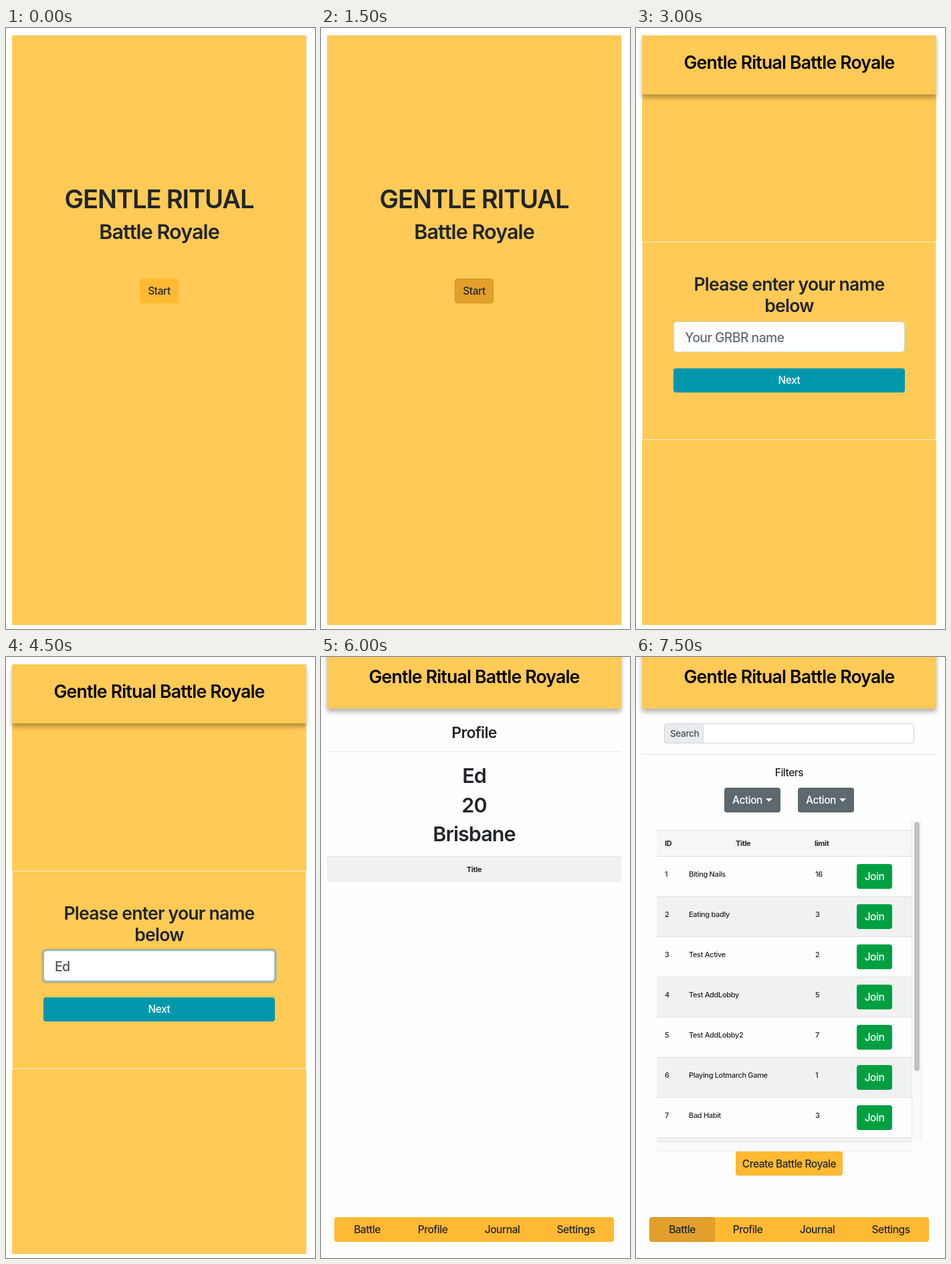
Animation, 462 px wide and 897 px high, one loop 8 s. Source, as an HTML page:

```html
<!DOCTYPE html>
<html lang="en">
<head>
<meta charset="utf-8">
<title>Habit app walkthrough</title>
<style>
  html, body { margin: 0; width: 100%; height: 100%; overflow: hidden; background: #fff; }
  svg { display: block; width: 462px; height: 897px; }
  text {
    font-family: Inter, Roboto, sans-serif;
    font-optical-sizing: none;
    letter-spacing: -0.03em;
    white-space: pre;
  }
</style>
</head>
<body>
<svg id="stage" viewBox="0 0 462 897">
  <defs>
    <filter id="shadow" x="-20" y="-20" width="502" height="160"
            filterUnits="userSpaceOnUse" color-interpolation-filters="sRGB">
      <feDropShadow dx="0" dy="5" stdDeviation="3.5" flood-color="#000" flood-opacity="0.3"/>
    </filter>
  </defs>
</svg>
<script>
const LOOP = 8000;
const MID = 229;
const BODY = 450;
const HEADING = 600;
const INK = '#212529';
const SAND = '#ffca55';
const AMBER = '#ffb932';
const PRESSED = '#e2a02b';
const PRESSED_EDGE = '#d09326';
const TEAL = '#0097ad';
const GREEN = '#00a042';
const SLATE = '#5d686f';
const RULE = '#dee2e6';
const STRIPE = '#f0f1f1';
const PAPER = '#fefefe';
const APP = 'Gentle Ritual Battle Royale';

const rect = (x, y, w, h, fill, r = 0) =>
  `<rect x="${x}" y="${y}" width="${w}" height="${h}" rx="${r}" fill="${fill}"/>`;

// Filled box whose 1px border lies inside its edges
const boxed = (x, y, w, h, fill, edge, r = 0) =>
  `<rect x="${x + .5}" y="${y + .5}" width="${w - 1}" height="${h - 1}" rx="${r}" fill="${fill}" stroke="${edge}"/>`;

const text = (str, x, y, size, { fill = INK, weight = BODY, anchor = 'start' } = {}) =>
  `<text x="${x}" y="${y}" font-size="${size}" font-weight="${weight}" fill="${fill}" text-anchor="${anchor}">${str}</text>`;

const centered = (str, x, y, size, weight = BODY, fill = INK) =>
  text(str, x, y, size, { fill, weight, anchor: 'middle' });

const panel = () => rect(9, 11, 440, 880, SAND);

const header = top =>
  `<g filter="url(#shadow)">${rect(9, top, 440, 88, SAND)}</g>` +
  centered(APP, MID, top + 50, 26.6, HEADING, '#000');

function startScreen(pressed) {
  const button = pressed
    ? boxed(200, 374, 58, 37, PRESSED, PRESSED_EDGE, 3.5)
    : rect(200, 374, 58, 37, AMBER, 4);
  return panel() +
    centered('GENTLE RITUAL', MID, 268.5, 38.2, HEADING) +
    centered('Battle Royale', MID, 315, 30.5, HEADING) +
    button + centered('Start', MID, 398, 15.5);
}

function nameScreen(typed) {
  const ring = typed ? rect(53, 435, 352, 52, '#bfb681', 7) : '';
  const value = typed
    ? text(typed, 73, 469, 19.4, { fill: '#495057' })
    : text('Your GRBR name', 73, 469, 19.4, { fill: '#646c73' });
  return panel() + header(11) +
    boxed(9, 319, 440, 296, 'none', '#fff0cd') +
    centered('Please enter your name', MID, 392, 26.6, HEADING) +
    centered('below', MID, 424, 26.6, HEADING) +
    ring + boxed(56, 438, 346, 46, '#fff', typed ? '#80bdee' : '#ced4da', 4.5) + value +
    rect(56, 508, 346, 36, TEAL, 4) +
    centered('Next', MID, 531, 15.5, BODY, '#fff');
}

function navBar(battleActive) {
  const tabs = [['Battle', 69], ['Profile', 167], ['Journal', 271], ['Settings', 381]];
  const active = battleActive ? boxed(20, 836, 98, 37, PRESSED, PRESSED_EDGE, 3.5) : '';
  return rect(20, 836, 418, 37, AMBER, 4) + active +
    tabs.map(([name, x]) => centered(name, x, 860, 15.5)).join('');
}

function profileScreen() {
  return rect(0, 0, 462, 897, PAPER) + header(-11) +
    centered('Profile', MID, 121, 23, HEADING) +
    rect(9, 141, 440, 1, '#e3e3e3') +
    ['Ed', '20', 'Brisbane'].map((s, i) => centered(s, MID, 188 + i * 43.5, 30.5, HEADING)).join('') +
    rect(9, 297, 440, 39, STRIPE) + rect(9, 297, 440, 1, RULE) +
    centered('Title', MID, 321, 11, 700) +
    navBar(false);
}

const dropdown = x =>
  rect(x, 195, 84, 37, SLATE, 4) +
  text('Action', x + 12, 219, 15.5, { fill: '#fff' }) +
  `<path d="M${x + 62} 211h10l-5 5z" fill="#fff"/>`;

function lobbyRow([title, limit], i) {
  const y = 297 + i * 60;
  return (i % 2 ? rect(31, y, 381, 60, STRIPE) : '') +
    rect(31, y, 381, 1, RULE) +
    text(i + 1, 43, y + 31, 11) +
    text(title, 79, y + 31, 11) +
    text(limit, 268, y + 31, 11) +
    rect(330, y + 12, 53, 37, GREEN, 4) +
    centered('Join', 356.5, y + 36, 15.5, BODY, '#fff');
}

function battleScreen() {
  const lobbies = [
    ['Biting Nails', 16], ['Eating badly', 3], ['Test Active', 2], ['Test AddLobby', 5],
    ['Test AddLobby2', 7], ['Playing Lotmarch Game', 1], ['Bad Habit', 3]
  ];
  const heads = [['ID', 43], ['Title', 149], ['limit', 267]];
  return rect(0, 0, 462, 897, PAPER) + header(-11) +
    boxed(42, 99, 374, 30, '#fff', '#ced4da', 3.5) +
    boxed(42, 99, 59, 30, '#e9ecef', '#ced4da', 3) +
    text('Search', 51, 119, 13.6, { fill: '#495057' }) +
    rect(9, 145, 440, 1, '#e6e6e6') +
    centered('Filters', MID, 178, 15.5) +
    dropdown(132) + dropdown(242) +
    rect(31, 258, 381, 39, '#f5f6f6') + rect(31, 258, 381, 1, RULE) +
    heads.map(([s, x]) => text(s, x, 282, 11, { weight: 700 })).join('') +
    lobbies.map(lobbyRow).join('') +
    rect(31, 717, 381, 6, STRIPE) + rect(31, 717, 381, 1, RULE) +
    rect(31, 723, 381, 15, '#fafafa') +
    rect(31, 723, 381, 1, '#e6e6e6') + rect(31, 737, 381, 1, '#ececec') +
    rect(412, 243, 15, 480, '#fafafa') +
    rect(412, 243, 1, 480, '#e6e6e6') + rect(426, 243, 1, 480, '#ececec') +
    rect(416, 246, 8, 372, '#c1c1c1', 4) +
    rect(149, 738, 160, 36, AMBER, 4) +
    centered('Create Battle Royale', MID, 762, 15.5) +
    navBar(true);
}

const scenes = [
  [0, startScreen(false)],
  [1500, startScreen(true)],
  [3000, nameScreen('')],
  [4500, nameScreen('Ed')],
  [6000, profileScreen()],
  [7500, battleScreen()]
];

const stage = document.getElementById('stage');
stage.insertAdjacentHTML('beforeend', scenes.map(([, body], i) =>
  `<g class="scene"${i ? ' display="none"' : ''}>${body}</g>`).join(''));
const layers = [...stage.querySelectorAll('.scene')];
const origin = performance.now();
let shown = 0;

function draw() {
  const t = (performance.now() - origin) % LOOP;
  const next = scenes.findLastIndex(([start]) => t >= start);
  if (next !== shown) {
    layers[shown].setAttribute('display', 'none');
    layers[next].removeAttribute('display');
    shown = next;
  }
  requestAnimationFrame(draw);
}
draw();
</script>
</body>
</html>
```
